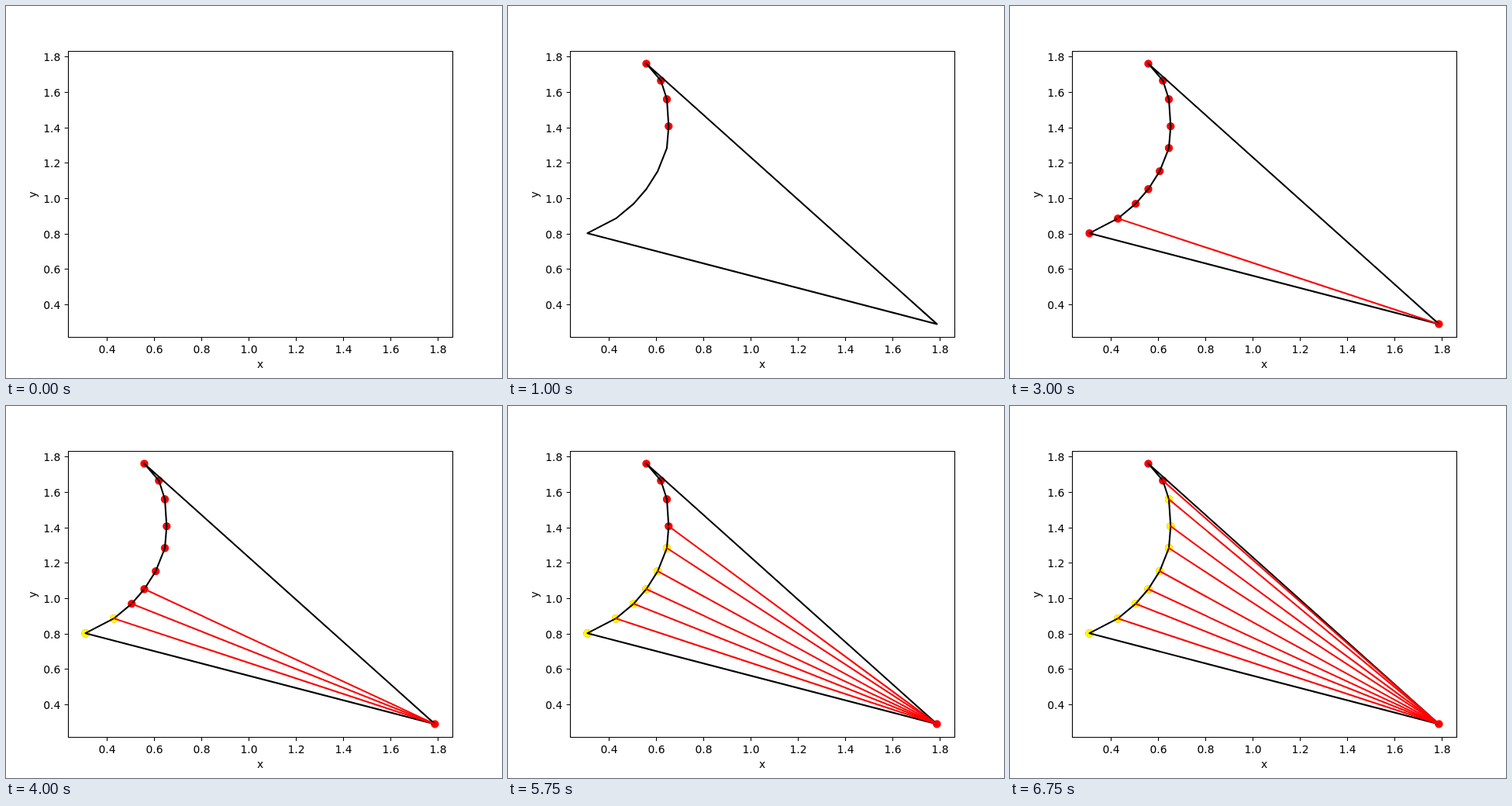
Recreate the animation shown at these times as an HTML page. Size 640 px wide and 480 px high, loop 7 s.

```html
<!DOCTYPE html>
<html lang="en">
<head>
<meta charset="utf-8">
<title>Polygon triangulation</title>
<style>
html, body { margin: 0; width: 100%; height: 100%; overflow: hidden; background: #fff; }
svg { display: block; width: 640px; height: 480px; }
text { font: 13.89px "DejaVu Sans", sans-serif; fill: #000; }
.axes { fill: none; stroke: #000; stroke-width: 1.11; }
.dot { stroke-width: 2.08; }
.line { fill: none; stroke-width: 2.083; stroke-linejoin: round; stroke-linecap: square; }
</style>
</head>
<body>
<svg id="plot" viewBox="0 0 640 480"></svg>
<script>
const STEP = 250, STEPS = 28;
const points = [
  [178.5, 74.4], [197.3, 96.3], [205, 120.3], [207.3, 155.1], [205, 183.3], [193.2, 213.1],
  [178.5, 236.2], [162.2, 255.1], [139.2, 274.2], [102.55, 293.2], [553.45, 410.4]
];
const apex = points[10];
const plot = document.getElementById("plot");
const timed = [];

function add(parent, tag, attrs, label) {
  const el = document.createElementNS("http://www.w3.org/2000/svg", tag);
  for (const key in attrs) el.setAttribute(key, attrs[key]);
  if (label) el.textContent = label;
  parent.appendChild(el);
  return el;
}

// Visible from the given step until the loop ends
function from(step, el) {
  timed.push({ step, el });
}

const dots = add(plot, "g", {});
const lines = add(plot, "g", {});
const frame = add(plot, "g", {});

function dot(step, [cx, cy], color) {
  from(step, add(dots, "circle", { class: "dot", cx, cy, r: 4.167, fill: color, stroke: color }));
}

function line(step, path, color) {
  from(step, add(lines, "path", { class: "line", d: "M" + path.join("L"), stroke: color }));
}

function text(x, y, label, anchor, extra) {
  add(frame, "text", { x, y, "text-anchor": anchor, ...extra }, label);
}

// Outline, then vertices one by one
line(1, [...points, points[0]], "#000");
points.forEach((p, i) => dot(i + 1, p, "#f00"));

// Diagonals to the apex, each followed by a finished vertex
for (let k = 0; k < 8; k++) {
  line(12 + 2 * k, [points[8 - k], apex], "#f00");
  dot(13 + 2 * k, points[9 - k], "#ff0");
}

// Axes
add(frame, "path", { class: "axes", d: "M80.5 58.5H576.5V427.5H80.5Z" });
for (let i = 0; i < 8; i++) {
  const x = 130.5 + 61 * i;
  const y = Math.floor(65.9 + 45.65 * i) + 0.5;
  add(frame, "path", { class: "axes", d: `M${x} 427.5v4.86M80.5 ${y}h-4.86` });
  text(x, 448, (0.4 + 0.2 * i).toFixed(1), "middle");
  text(70.3, y + 5.5, (1.8 - 0.2 * i).toFixed(1), "end");
}
text(328, 467, "x", "middle");
text(0, 0, "y", "middle", { transform: "translate(39 243.5) rotate(-90)" });

let shown = -1;
const start = performance.now();
function draw() {
  const step = Math.floor((performance.now() - start) / STEP) % STEPS;
  if (step !== shown) {
    shown = step;
    for (const t of timed) t.el.style.display = step >= t.step ? "" : "none";
  }
  requestAnimationFrame(draw);
}
draw();
</script>
</body>
</html>
```
